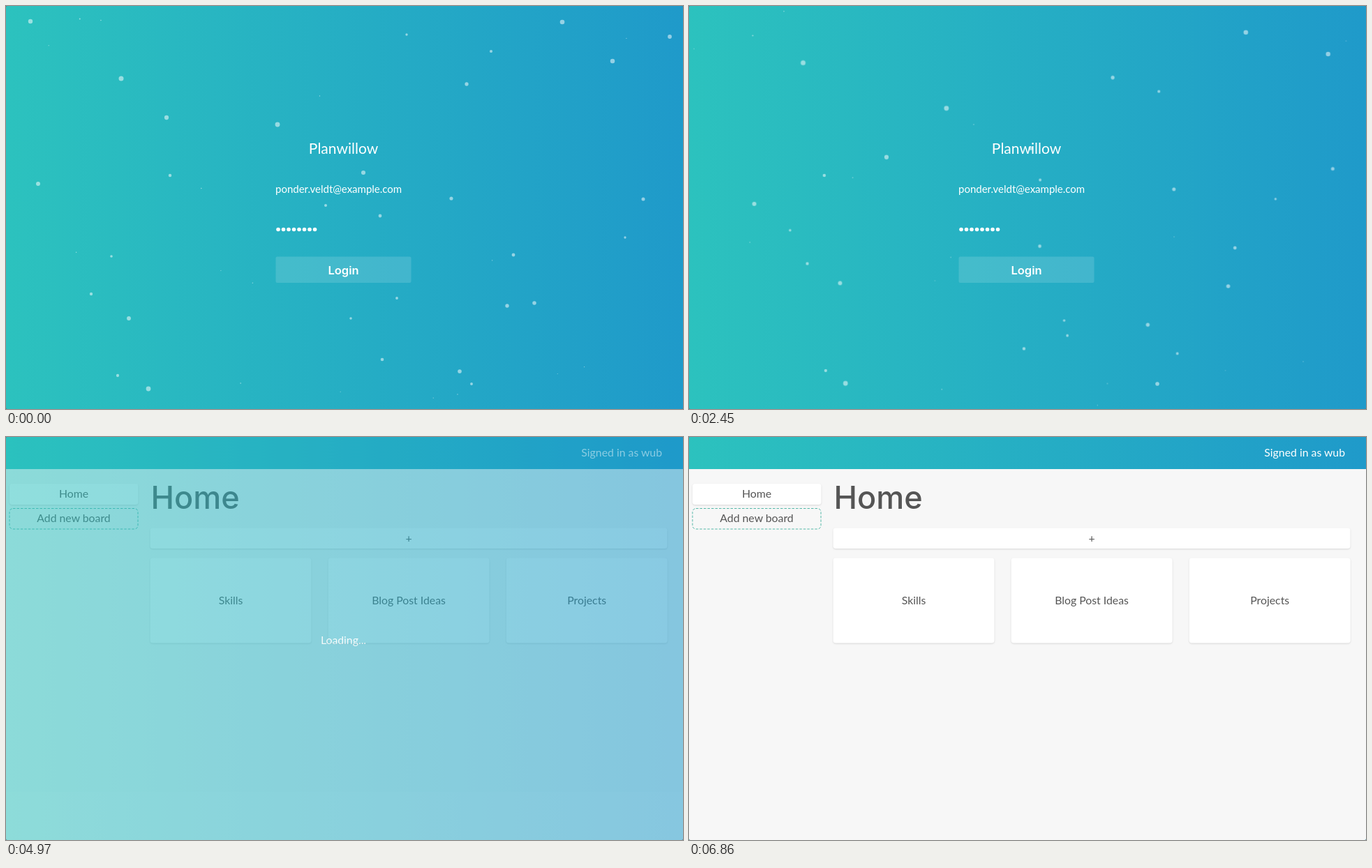
Animation of 970 by 578 pixels, one loop 6.93 s. Source, as an HTML page:

```html
<!DOCTYPE html>
<html lang="en">
<head>
<meta charset="utf-8">
<title>Login to board</title>
<style>
  html, body { margin: 0; width: 100%; height: 100%; overflow: hidden; background: #56707a; }
  svg { display: block; width: 100%; height: 100%; border-radius: 2px; }
  text { font: 15.8px Lato, "Open Sans", sans-serif; fill: #fff; }
  .mid { text-anchor: middle; }
  .title { font-size: 21px; }
  .email { font-size: 15px; }
  .button { font: 600 16.5px Inter, Roboto, sans-serif; }
  .heading { font: 500 45px Inter, Roboto, sans-serif; }
  .ink text { fill: #555; }
  .card { fill: #fff; filter: drop-shadow(0 1px 1px rgba(0, 0, 0, .13)); }
  .dashed { fill: none; stroke: #55b8a8; stroke-dasharray: 3.5 2; }

  #login, #loading, #home, #dots circle { animation: 6930ms infinite; }
  #login { animation-name: leave; animation-timing-function: step-end; }
  #loading { animation-name: enter; animation-timing-function: step-end; }
  #home { animation-name: fade; }
  #dots circle { animation-name: drift; fill: #fff; fill-opacity: .52; }

  @keyframes leave { 0% { opacity: 1; } 46.4646%, 100% { opacity: 0; } }
  @keyframes enter { 0% { opacity: 0; } 46.4646%, 100% { opacity: 1; } }
  @keyframes fade {
    0% { opacity: 0; }
    69.697% { opacity: 0; animation-timing-function: ease; }
    76.912%, 100% { opacity: 1; }
  }
  @keyframes drift {
    0% { transform: translate(0, 0); animation-timing-function: steps(45); }
    45.4545%, 100% { transform: translate(var(--dx), var(--dy)); }
  }
</style>
</head>
<body>
<svg viewBox="0 0 970 578" preserveAspectRatio="none">
  <defs>
    <linearGradient id="sea" gradientUnits="userSpaceOnUse" x1="0" x2="970" y1="0" y2="0">
      <stop stop-color="#2cc2be"/>
      <stop offset="1" stop-color="#1f9aca"/>
    </linearGradient>
  </defs>
  <rect width="970" height="578" fill="url(#sea)"/>

  <g id="login">
    <g id="dots"></g>
    <text class="mid title" x="483.5" y="212">Planwillow</text>
    <text class="email" x="386" y="267.5">ponder.veldt@example.com</text>
    <g id="password" fill="#fff"></g>
    <rect x="386.5" y="359.5" width="194" height="37.5" rx="2" fill="#fff" fill-opacity=".14"/>
    <text class="mid button" x="483.5" y="385">Login</text>
  </g>

  <text id="loading" class="mid" x="483.5" y="297" fill-opacity=".92">Loading...</text>

  <g id="home">
    <rect width="970" height="578" fill="#f7f7f7"/>
    <rect width="970" height="46" fill="url(#sea)"/>
    <text x="940" y="27.5" text-anchor="end">Signed in as wub</text>
    <g class="ink">
      <rect class="card" x="5" y="67" width="184.5" height="30" rx="4"/>
      <text class="mid" x="97" y="87">Home</text>
      <rect class="dashed" x="5" y="102.5" width="184" height="29.5" rx="5"/>
      <text class="mid" x="97" y="122">Add new board</text>
      <text class="heading" x="207.5" y="102.5">Home</text>
      <rect class="card" x="206.5" y="130.5" width="741" height="29.5" rx="4"/>
      <text class="mid" x="577" y="151">+</text>
      <g id="cards"></g>
    </g>
  </g>
</svg>
<script>
  const byId = id => document.getElementById(id);

  function add(parent, tag, attrs, text = "") {
    const node = document.createElementNS(parent.namespaceURI, tag);
    for (const key in attrs) node.setAttribute(key, attrs[key]);
    node.textContent = text;
    return parent.appendChild(node);
  }

  function addDot(r, x, y, dx, dy) {
    add(byId("dots"), "circle", { r, cx: x, cy: y, style: `--dx:${dx}px;--dy:${dy}px` });
  }

  // Start x, start y, drift x, drift y; rows run from large dots to small ones.
  const dots = [
    [165, 104, -2, -29], [389, 170, -26, -30], [204, 549, 26, -10], [797, 23, 1, 19],
    [869, 79, 60, -13], [35, 22, -40, -55], [230, 160, 68, 73], [512, 239, -29, -45],
    [46, 255, 61, 37], [176, 448, 52, -65], [951, 44, 32, -20], [650, 524, 27, 23],
    [757, 426, 20, -31], [718, 430, -78, 35], [660, 112, -68, -12], [638, 276, 73, -17],
    [913, 277, 12, -56], [727, 357, 71, -13], [536, 301, -43, 56], [539, 507, -76, -20],
    [235, 243, -53, 0], [122, 413, 61, -56], [160, 530, 46, -9], [695, 65, -28, 74],
    [458, 286, 58, -47], [667, 542, 42, -56], [560, 419, -23, 69], [151, 359, -8, -48],
    [494, 448, 56, 4], [574, 41, -39, -61], [887, 332, -60, -71]
  ];
  dots.forEach((dot, i) => addDot(3.5 - i * .062, ...dot));

  // Faint specks.
  let seed = 29;
  const random = () => (seed = seed * 16807 % 2147483647) / 2147483647;
  for (let i = 0; i < 16; i++) {
    addDot(.5 + random() * .6, random() * 970, random() * 578,
      (random() - .5) * 140, (random() - .5) * 120);
  }

  for (let i = 0; i < 8; i++) add(byId("password"), "circle", { cx: 390 + i * 7.5, cy: 320.5, r: 2.8 });

  ["Skills", "Blog Post Ideas", "Projects"].forEach((name, i) => {
    const x = 206.5 + i * 255.1;
    add(byId("cards"), "rect", { class: "card", x, y: 173.5, width: 231, height: 122, rx: 4 });
    add(byId("cards"), "text", { class: "mid", x: x + 115.5, y: 239.5 }, name);
  });
</script>
</body>
</html>
```
